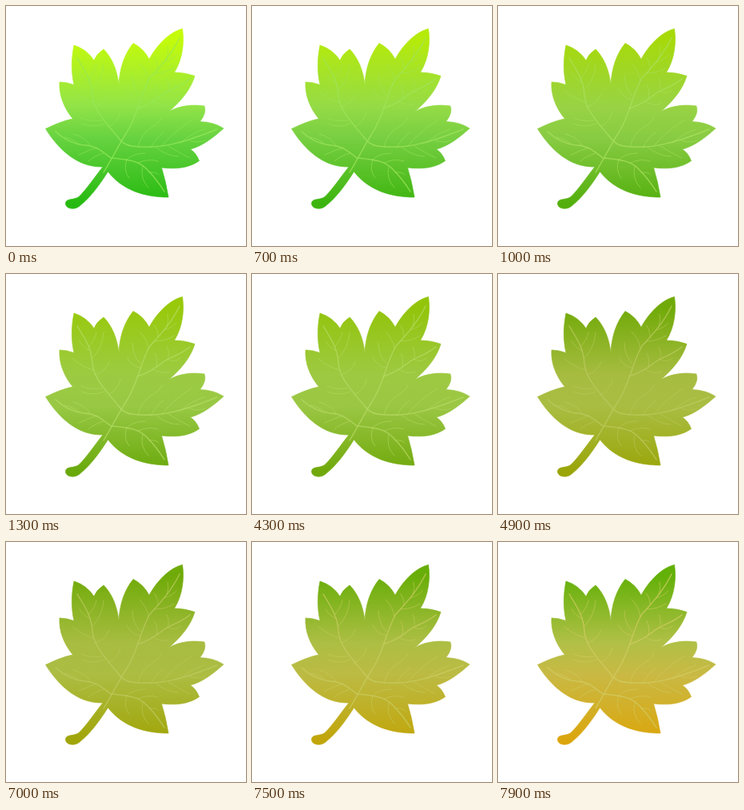
An HTML page that plays this animation: 300x300 px, repeating every 8000 ms.

```html
<!DOCTYPE html>
<html lang="en">
<head>
<meta charset="utf-8">
<title>Turning leaf</title>
<style>
  html, body { margin: 0; width: 100%; height: 100%; overflow: hidden; background: #fff; }
  svg { display: block; width: 100vw; height: 100vh; }

  /* Each part holds its four seasonal colours; the fades run in 100 ms steps. */
  stop, .veins { animation: turn 8s infinite; }
  .top  { --a: #c4fb0a; --b: #98c90a; --c: #70aa08; --d: #62b008; }
  .mid  { --a: #92e348; --b: #9ccb42; --c: #a6bc40; --d: #b0c046; }
  .core { --a: #66d240; --b: #98c844; --c: #a9bd42; --d: #c9b944; }
  .low  { --a: #26ba10; --b: #69a90c; --c: #9aa508; --d: #dba60c; }
  .veins { --a: #96e858; --b: #b6dc66; --c: #bccb60; --d: #d2cc64; }

  @keyframes turn {
    0%     { stop-color: var(--a); color: var(--a); animation-timing-function: step-end; }
    6.25%  { stop-color: var(--a); color: var(--a); animation-timing-function: steps(9, start); }
    17.5%  { stop-color: var(--b); color: var(--b); animation-timing-function: step-end; }
    53.75% { stop-color: var(--b); color: var(--b); animation-timing-function: steps(7, start); }
    62.5%  { stop-color: var(--c); color: var(--c); animation-timing-function: step-end; }
    87.5%  { stop-color: var(--c); color: var(--c); animation-timing-function: steps(10, start); }
    100%   { stop-color: var(--d); color: var(--d); }
  }

  .leaf { fill: url(#tint); stroke: url(#tint); stroke-width: .7; }
  .veins { fill: none; stroke: currentColor; stroke-linecap: round; stroke-linejoin: round; }
  .main { stroke-width: 1.4; opacity: .75; }
  .twig { stroke-width: 1; opacity: .55; }
</style>
</head>
<body>
<svg viewBox="0 0 300 300">
  <defs>
    <linearGradient id="tint" gradientUnits="userSpaceOnUse" x1="0" y1="28" x2="0" y2="254">
      <stop class="top" offset=".06"/>
      <stop class="mid" offset=".43"/>
      <stop class="core" offset=".61"/>
      <stop class="low" offset=".97"/>
    </linearGradient>
  </defs>

  <path class="leaf" d="M220.500 28.500
    C223 45 221 66 210.500 83 Q224 83 236 87.500
    C231 104 219 119 203.500 132 C218 124 234 123 248 125
    Q251 134 242.500 144.500 Q260 145 272 153
    C261 163 246 175 230.500 179 Q238 184 241.500 193.500
    C228 203 212 204 194.500 202 Q200 220 203 239
    C173 239 145 230 127.500 207
    C118 222 106 239 92 250 C85 256 74 253 74.500 246.500
    C75 240 85 243 91 238.500 C100 230 110 215 121 201
    C90 202 66 180 49.500 153.500 C60 148.500 71 143.500 83.500 141
    C72 127 66 111 67 95 Q76 95 85 98.500
    C81 81 82 64 85 49 Q101 54 110 68 Q113 60 122 54
    C133 65 139 81 141 98 C142 78 148 60 159 46.500
    Q172 53 179 66.500 C188 50 203 33 220.500 28.500Z"/>

  <g class="veins">
    <path class="main" d="M122 208C134 188 143 170 151 158C166 134 167 112 180 90C191 78 207 61 217 40
      M89 65C97 79 107 91 108 112C110 132 128 149 140 164Q147 174 157 175C193 180 224 170 264 154
      M164 128C177 124 185 119 194 112C203 104 217 102 230 91
      M131 190C120 181 113 175 98 174Q78 172 62 157
      M132 190C151 192 166 193 176 204Q188 216 198 232"/>
    <path class="twig" d="M178 94Q177 82 167 72M190 79Q190 69 185 64M201 66Q204 57 202 50
      M186 84Q200 84 210 77M198 70Q208 67 213 61
      M168 112Q158 102 158 86M167 117Q156 115 151 104
      M188 116Q190 106 186 99M203 104Q204 96 201 91M183 119Q195 126 204 122M201 106Q211 112 218 105
      M103 91Q111 83 113 73M108 105Q121 92 122 73M106 96Q97 93 92 84M109 120Q97 117 83 106
      M111 126Q124 123 129 110M120 143Q105 145 94 140M128 151Q140 145 143 132
      M123 147Q108 153 94 147
      M181 177Q188 164 197 158M194 176Q209 157 232 143M218 171Q233 158 248 154
      M165 176Q169 159 183 151Q191 147 195 139
      M188 177Q202 188 216 188M203 175Q219 185 230 190M229 168Q240 172 249 168
      M105 174Q99 164 84 160M91 172Q83 166 73 164M114 177Q104 180 91 186M122 184Q109 188 103 194
      M151 192Q159 184 174 184M165 196Q179 190 190 194M151 192Q146 205 154 215M171 200Q167 216 178 227
      M179 208Q188 207 191 211"/>
  </g>
</svg>
</body>
</html>
```
